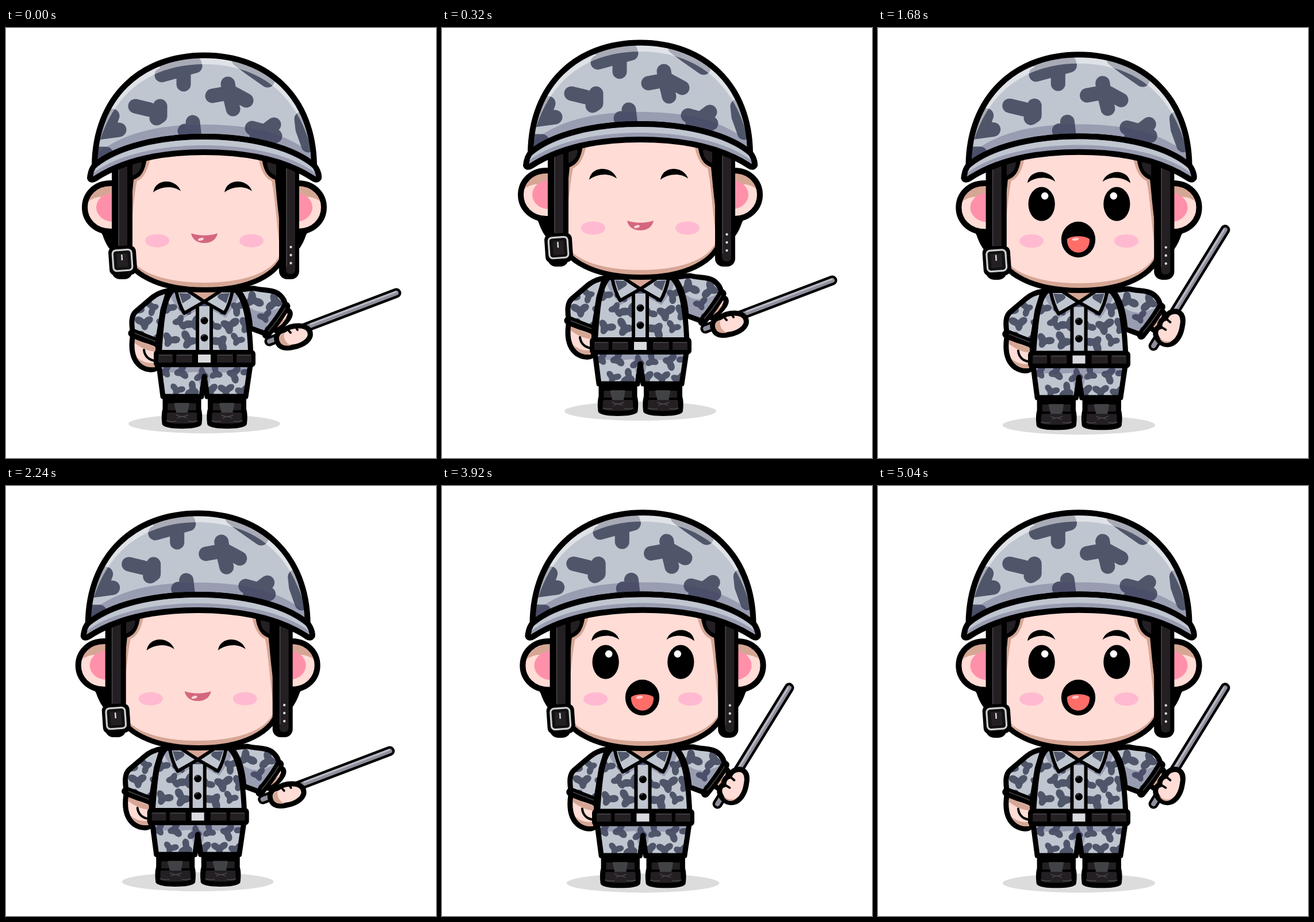
Recreate the animation shown at these times as an HTML page. Size 748 by 748 pixels, loop 5400 ms.

```html
<!DOCTYPE html>
<html lang="en">
<head>
<meta charset="utf-8">
<title>Cadet with baton</title>
<style>
  html, body { margin: 0; width: 100%; height: 100%; overflow: hidden; background: #fff; }
  svg { display: block; width: 100vw; height: 100vh; }
  .line { stroke: #000; stroke-width: 9; stroke-linejoin: round; stroke-linecap: round; }
  .bold { stroke-width: 10; }
  .cuff { stroke-width: 15; }
  .rod { stroke-width: 17; }
  .thin { fill: none; stroke: #000; stroke-width: 4; stroke-linecap: round; stroke-linejoin: round; }
  .gloss { fill: none; stroke: #48464a; stroke-width: 1.5; }
  .none { fill: none; }
  .cloth { fill: #c0c6d0; }
  .camo { fill: #50566a; }
  .patches { fill: none; stroke: #50566a; stroke-width: 25; stroke-linecap: round; stroke-linejoin: round; }
  .shade { fill: rgba(65, 63, 107, .3); }
  .skin { fill: #ffdcd6; }
  .tan { fill: #d6a695; }
  .dark { fill: #231f22; }
</style>
</head>
<body>
<svg viewBox="0 0 748 748">
  <defs>
    <path id="dome" d="M154 240C155 120 235 47.500 345 47.500S535 120 536 240C495 205 420 189 345 189S195 205 154 240Z"/>
    <path id="shirt" d="M290 456C273 472 270 510 266 572H426C424 510 417 472 400 456Z"/>
    <path id="pants" d="M265 580L273 641H340L345 606L350 641H417L426 580Z"/>
    <path id="sleeveL" d="M283 457C268 459 260 464 253 470L226 493C218 500 218 512 220 527L264 545L273 490Z"/>
    <path id="sleeveR" d="M402 454C414 457 422 452 432 453C448 457 462 455 472 461C482 468 486 476 486 485L452 532L425 522C423 495 416 470 402 454Z"/>
    <path id="earShape" d="M182 270C154 270 137 290 137 312S154 354 182 354H200V270Z"/>
    <path id="arch" d="M256 286C260 260 297 262 304 284C292 274 270 275 256 286Z"/>
    <clipPath id="domeClip"><use href="#dome"/></clipPath>
    <clipPath id="shirtClip"><use href="#shirt"/></clipPath>
    <clipPath id="pantsClip"><use href="#pants"/></clipPath>
    <clipPath id="sleeveLClip"><use href="#sleeveL"/></clipPath>
    <clipPath id="sleeveRClip"><use href="#sleeveR"/></clipPath>
    <clipPath id="earClip"><use href="#earShape"/></clipPath>

    <g id="boot">
      <path class="line dark" d="M277 645H335V663C337 670 337 680 336 688C328 694 284 694 276 688C275 680 275 670 277 663Z"/>
      <path d="M292 652H319L316 669H296Z" fill="#414245"/>
      <path class="thin" d="M277 667H294M318 667H335M277 651H335"/>
      <path class="gloss" d="M296 673Q306 679 317 673M298 679Q306 673 315 679M279 683Q288 686 296 684M317 684Q326 686 333 683M294 653H318"/>
    </g>
    <g id="ear">
      <use href="#earShape" class="skin"/>
      <g clip-path="url(#earClip)">
        <path class="tan" d="M130 262H205V305C185 292 160 288 141 303Z"/>
        <ellipse cx="186" cy="312" rx="29" ry="25" fill="#ff90aa"/>
      </g>
      <use href="#earShape" class="line bold none"/>
      <path d="M165 355L188 353V393C178 384 172 372 168 360Z"/>
    </g>
    <g id="hairSide">
      <path class="tan" d="M208 215H253C248 250 238 262 228 266C223 288 221 320 214 380Z"/>
      <path d="M206 215H246C244 247 236 259 222 264C219 290 217 330 206 385Z"/>
      <path class="dark" d="M220 234H236C236 246 230 253 220 257Z"/>
    </g>
  </defs>

  <g id="figure">
    <ellipse cx="345" cy="688.500" rx="132" ry="16.500" fill="#dcdcdc"/>

    <use href="#pants" class="cloth"/>
    <g clip-path="url(#pantsClip)">
      <g id="camoPants" class="camo"></g>
      <path class="shade" d="M260 580H430V596Q385 602 358 598L353 622L345 603L337 622L332 598Q300 602 260 596Z"/>
    </g>
    <use href="#pants" class="line none"/>
    <use href="#boot"/>
    <use href="#boot" transform="translate(78.500)"/>

    <path class="line skin" d="M220 538C217 560 221 579 235 589C246 596 258 596 263 590V548Z"/>
    <path class="tan" d="M224 541L260 555V563C245 562 233 555 224 548ZM228 573C238 582 249 584 259 582V590C244 592 234 584 228 573Z"/>
    <path class="thin" d="M240 560C241 571 249 578 260 579"/>
    <use href="#sleeveL" class="cloth"/>
    <g id="camoSleeveL" class="camo" clip-path="url(#sleeveLClip)"></g>
    <use href="#sleeveL" class="line none"/>
    <path class="line cuff" d="M220 531L262 547"/>
    <path class="gloss" d="M224 531L260 545"/>

    <g id="armPoint">
      <path class="line rod" d="M458 545L679 461"/>
      <path d="M458 545L679 461" stroke="#8d8f9b" stroke-width="8" stroke-linecap="round"/>
      <path d="M530 515L678 459" stroke="#b9bac4" stroke-width="3" stroke-linecap="round"/>
      <path class="line skin" d="M468 512C474 500 484 487 491 491C499 497 491 508 481 517L468 526Z"/>
      <path class="tan" d="M471 515L489 503L480 515L472 521Z"/>
      <path class="line skin" d="M473 548C467 538 473 527 483 526C492 519 501 518 509 518C524 518 531 526 529 536C526 546 513 553 500 555C487 558 477 557 473 548Z"/>
      <path class="tan" d="M476 545C474 538 478 532 484 530C482 540 487 549 496 552C486 554 479 552 476 545Z"/>
      <path class="thin" d="M488 522L495 530M502 517L507 525"/>
    </g>
    <g id="armRaise" transform="translate(-5 -1.500)">
      <path class="line rod" d="M479 553L603 352"/>
      <path d="M479 553L603 352" stroke="#8d8f9b" stroke-width="8" stroke-linecap="round"/>
      <path d="M516 490L601 352" stroke="#b9bac4" stroke-width="3" stroke-linecap="round"/>
      <path class="line skin" d="M471 520C474 508 482 494 490 492C500 492 499 503 494 510L482 527Z"/>
      <path class="tan" d="M475 517L491 507L482 522Z"/>
      <path class="line skin" d="M486 541C480 532 482 522 490 520C489 512 494 506 500 505C502 497 512 491 521 494C530 498 531 508 529 518C527 533 520 545 511 549C500 553 491 549 486 541Z"/>
      <path class="tan" d="M489 539C496 546 505 547 512 543C505 551 494 549 489 539Z"/>
      <path class="thin" d="M492 520L500 525M501 506L508 512"/>
    </g>
    <use href="#sleeveR" class="cloth"/>
    <g clip-path="url(#sleeveRClip)">
      <g id="camoSleeveR" class="camo"></g>
      <path class="shade" d="M410 470C424 490 440 500 466 490L488 482L452 535L420 525Z"/>
    </g>
    <use href="#sleeveR" class="line none"/>
    <path class="line cuff none" d="M487 484C479 500 467 515 453 533"/>
    <path class="gloss" d="M486 487C478 500 467 515 456 528"/>

    <use href="#shirt" class="cloth"/>
    <g clip-path="url(#shirtClip)">
      <g id="camoShirt" class="camo"></g>
      <path class="shade" d="M280 452H410L400 478L382 504L345 483L310 504L290 475Z"/>
    </g>
    <use href="#shirt" class="line none"/>
    <path d="M333 484H357V568H333Z" class="cloth"/>
    <path class="line" style="stroke-width:6" d="M333 484V566M357 484V566"/>
    <path class="tan" d="M312 455H378L345 476Z"/>
    <g class="cloth line" style="stroke-width:6">
      <path d="M296 457C299 472 303 485 310 496L345 476L316 457Z"/>
      <path d="M394 457C391 472 387 485 380 496L345 476L374 457Z"/>
    </g>
    <path class="camo" d="M301 461L317 462Q326 467 318 472T307 479ZM389 461L373 462Q364 467 372 472T383 479Z"/>
    <circle cx="345" cy="509" r="6.500"/>
    <circle cx="345" cy="539" r="6.500"/>
    <path class="gloss" d="M341 507A5 5 0 0 1 346 504M341 537A5 5 0 0 1 346 534"/>

    <rect x="257" y="560" width="177" height="30" rx="7"/>
    <path class="dark" d="M265 568H290V582H265ZM296 568H324V582H296ZM367 568H395V582H367ZM401 568H427V582H401Z"/>
    <path class="gloss" d="M266 569H289M297 569H323M368 569H394M402 569H426"/>
    <rect x="334" y="568" width="22" height="14" fill="#d9dadd"/>

    <use href="#ear"/>
    <use href="#ear" transform="matrix(-1 0 0 1 690 0)"/>
    <path class="line tan" d="M204 200V385C212 429 268 455 345 455.500S478 429 486 385V200Z"/>
    <path class="skin" d="M214 205H476V395C462 427 410 443 345 443S228 427 214 395Z"/>
    <use href="#hairSide"/>
    <use href="#hairSide" transform="matrix(-1 0 0 1 690 0)"/>
    <ellipse cx="263" cy="370" rx="21" ry="11.500" fill="#ffbad1"/>
    <ellipse cx="427" cy="370" rx="21" ry="11.500" fill="#ffbad1"/>

    <g id="faceSmile">
      <use href="#arch"/>
      <use href="#arch" transform="translate(124)"/>
      <path d="M322 357C336 362 354 362 368 357C366 368 357 374 345 374S324 368 322 357Z" fill="#d4677f"/>
      <ellipse cx="339" cy="367.500" rx="5" ry="2.300" transform="rotate(-14 339 367.500)" fill="#ffd9dd"/>
    </g>
    <g id="faceTalk">
      <use href="#arch" transform="translate(0 -16.500)"/>
      <use href="#arch" transform="matrix(-1 0 0 1 690 -16.500)"/>
      <ellipse cx="280.500" cy="306" rx="23" ry="29.500"/>
      <ellipse cx="410.500" cy="306" rx="23" ry="29.500"/>
      <circle cx="286" cy="292" r="6.300" fill="#fff"/>
      <circle cx="405" cy="292" r="6.300" fill="#fff"/>
      <ellipse cx="344" cy="367.500" rx="29.500" ry="31"/>
      <path d="M324.500 367C331 360 357 360 363.500 367C364 381 355 390 344 390S324 381 324.500 367Z" fill="#ff6d69"/>
      <ellipse cx="339" cy="367" rx="6" ry="2.600" transform="rotate(-8 339 367)" fill="#ffc9c6"/>
    </g>

    <rect x="184" y="225" width="36" height="212" rx="14"/>
    <path class="dark" d="M195 235H211V380H195Z"/>
    <path class="gloss" d="M196 240V378"/>
    <g transform="rotate(-4 203 404)">
      <rect x="179" y="379" width="48" height="51" rx="11"/>
      <rect x="186" y="386" width="33" height="36" rx="6" fill="#111" stroke="#cfcfd2" stroke-width="3.200"/>
      <rect x="193" y="392" width="19" height="24" class="dark"/>
      <path d="M202 394V404" stroke="#d8d8da" stroke-width="2.500"/>
    </g>
    <rect x="475" y="225" width="35" height="212" rx="14"/>
    <path class="dark" d="M487 235H503V420Q503 428 495 428T487 420Z"/>
    <path class="gloss" d="M488 240V415"/>
    <path d="M495.500 381V410" stroke="#d8d8da" stroke-width="4.400" stroke-linecap="round" stroke-dasharray="0 14"/>

    <use href="#dome" class="cloth"/>
    <g clip-path="url(#domeClip)">
      <path class="patches" d="M271 82L300 74L329 66M278 62H328M309 78V98M405 55L425 70L455 91M386 97L389 116L395 141M359 118L392 112L418 126M225 136L250 142M268 136V153L262 157M185 153L176 178M160 182L197 177M325 164L328 190M311 179L320 188M428 174L450 180L466 168M436 188H468M514 158L516 176L526 204M155 219H174"/>
      <path class="shade" d="M150 226C200 180 270 168 345 168S490 180 540 226V245H150Z"/>
      <path fill="#fff" opacity=".5" d="M154 235C155 120 235 48 345 48S535 120 536 235C515 115 440 63 345 63S175 115 154 235Z"/>
    </g>
    <use href="#dome" class="line bold none"/>
    <path class="line bold" fill="#9a9db1" d="M155 238C195 205 270 189 345 189S495 205 535 238C540 243 545 254 544 261C541 265 538 264 535 262C480 226 410 216 345 216S210 226 155 262C150 265 147 264 146 261C147 250 150 243 155 238Z"/>
    <path class="cloth" d="M156 244C196 211 270 194 345 194S494 211 534 244L538 252C490 216 410 204 345 204S200 216 152 252Z"/>
  </g>
</svg>
<script>
const $ = id => document.getElementById(id);

function seeded(seed) {
  return () => (seed = seed * 16807 % 2147483647) / 2147483647;
}

// A three-lobed patch with a random turn.
function patch(x, y, size, random) {
  const turn = random() * 2 * Math.PI, lean = random() * 2 * Math.PI, steps = 36;
  const points = Array.from({ length: steps }, (_, i) => {
    const a = i / steps * 2 * Math.PI;
    const r = size * (.74 + .26 * Math.cos(3 * a + turn) + .14 * Math.cos(2 * a + lean));
    return `${(x + r * Math.cos(a)).toFixed(1)} ${(y + r * Math.sin(a)).toFixed(1)}`;
  });
  return `M${points.join('L')}Z`;
}

// Staggered rows of patches, each a little off its place.
function scatter(id, left, top, right, bottom, seed) {
  const random = seeded(seed), pitch = 29, jitter = () => (random() - .5) * 7;
  let d = '';
  for (let y = top, row = 0; y <= bottom; y += pitch, row++)
    for (let x = left + row % 2 * pitch / 2; x <= right; x += pitch)
      d += patch(x + jitter(), y + jitter(), 13 + 4 * random(), random);
  $(id).innerHTML = `<path d="${d}"/>`;
}
scatter('camoShirt', 286, 486, 430, 572, 11);
scatter('camoPants', 280, 600, 430, 650, 23);
scatter('camoSleeveL', 228, 485, 280, 545, 37);
scatter('camoSleeveR', 434, 474, 490, 535, 41);

const LOOP = 5400, BEAT = 560, RISE = 22, TICK = 40, TICKS = 8;

function pose(t) {
  const beat = Math.floor(t / BEAT);
  if (beat === 0) return { x: 0, y: -RISE * Math.min(TICKS, Math.floor(t / TICK)) / TICKS, scale: 1, talk: false };
  if (beat % 2 === 0) return { x: -11.3, y: 0, scale: 1, talk: false };
  return { x: beat === 1 ? -9.4 : 2.6, y: -1.5, scale: 1.0055, talk: true };
}

function draw(now) {
  const { x, y, scale, talk } = pose(now % LOOP);
  $('figure').setAttribute('transform', `translate(${x} ${y}) scale(${scale})`);
  for (const id of ['armRaise', 'faceTalk']) $(id).style.display = talk ? '' : 'none';
  for (const id of ['armPoint', 'faceSmile']) $(id).style.display = talk ? 'none' : '';
}

const start = performance.now();
function loop() {
  draw(performance.now() - start);
  requestAnimationFrame(loop);
}
loop();
</script>
</body>
</html>
```
